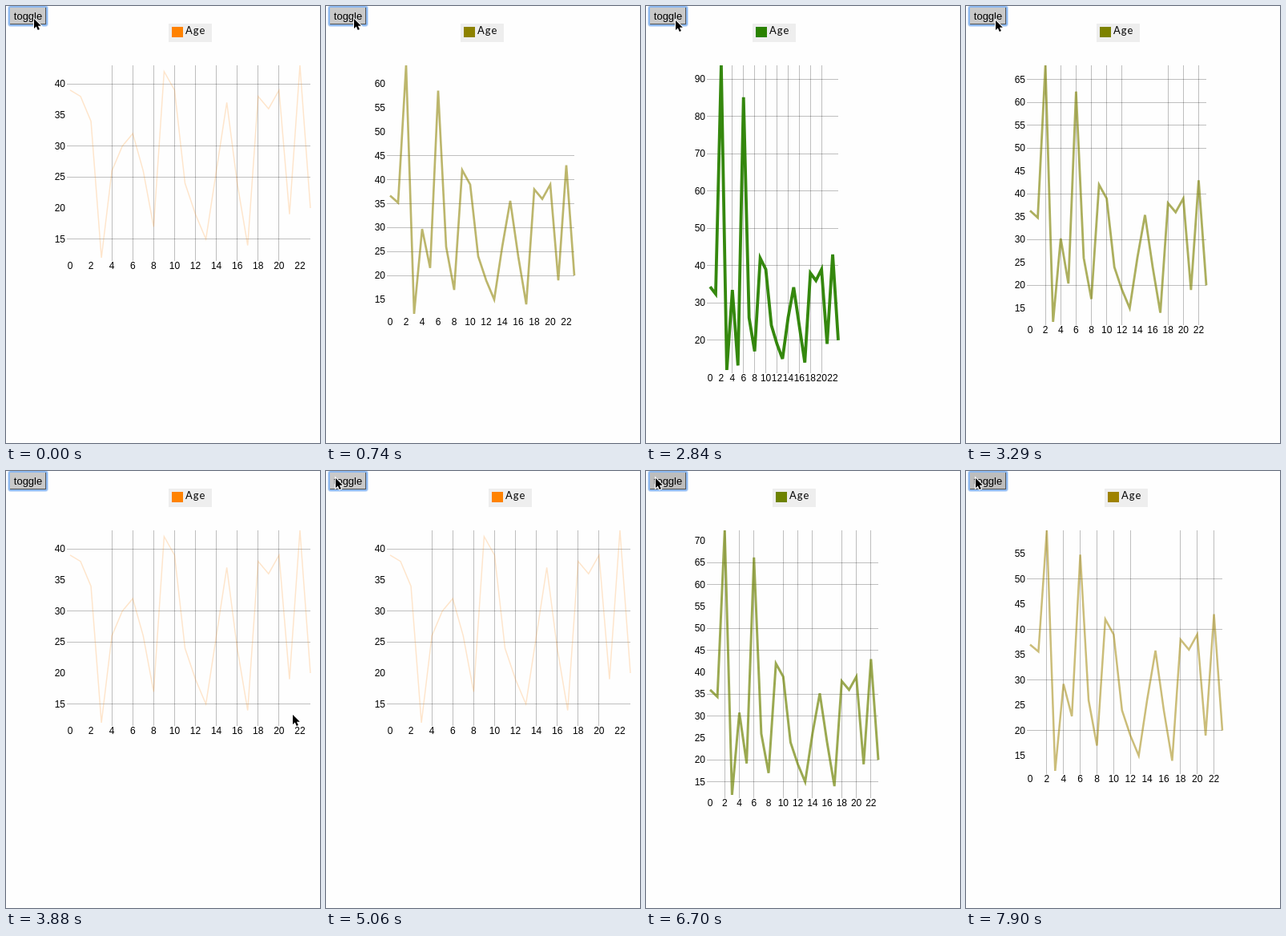
An HTML page with a canvas for the animation above (8000 ms loop, 392x545 px).

```html
<!DOCTYPE html>
<html lang="en">
<head>
<meta charset="utf-8">
<title>Chart toggle</title>
<style>
html, body { margin: 0; width: 100%; height: 100%; overflow: hidden; background: #fefefe; }
canvas { display: block; }
</style>
</head>
<body>
<canvas id="stage" width="392" height="545"></canvas>
<script>
const ctx = document.getElementById('stage').getContext('2d');
const LOOP = 8000, STEP = 148.5;
const LEFT = 80, TOP = 74;

const ages = [39, 38, 34, 12, 26, 30, 32, 26, 17, 42, 39, 24, 19, 15, 26, 37, 24, 14, 38, 36, 39, 19, 43, 20];
const toggled = { 0: 34, 1: 32, 2: 98, 4: 34, 5: 12, 6: 89, 15: 34 };

const mix = (a, b, p) => a + (b - a) * p;

// Number of redraws since a phase began, up to count
function steps(t, start, count) {
  return t < start ? 0 : Math.min(count, 1 + Math.floor((t - start + 10) / STEP));
}

// 0 = wide orange chart, 1 = tall green chart
function progressAt(t) {
  if (t < 2840) {
    const k = steps(t, 450, 7);
    return k && (2 * k + 1) / 15;
  }
  if (t < 6110) return 1 - (2 * steps(t, 2840, 8) - 1) / 15;
  if (t < 7750) return Math.min(0.6, steps(t, 6110, 5) / 7.5);
  return 0.6 - (2 * steps(t, 7750, 2) - 1) / 15;
}

const leaving = [[36, 16], [140, 90], [285, 205], [375, 290], [357, 302]];
const returning = [[357, 302], [350, 295], [310, 250], [225, 170], [120, 85], [45, 30], [12, 10], [3, 4], [11, 7]];

function cursorAt(t) {
  if (t < 2840) return [34, 14];
  if (t < 4030) return leaving[Math.max(0, steps(t, 2840, 8) - 4)];
  return returning[steps(t, 4030, 8)];
}

function text(label, x, y, align, font) {
  ctx.font = font;
  ctx.textAlign = align;
  ctx.fillStyle = '#000';
  ctx.fillText(label, x, y);
}

// Grid lines that straddle two pixels fade out
function isCrisp(v) {
  const f = v - Math.floor(v);
  return f > 0.12 && f < 0.875;
}

function drawChart(p) {
  const width = mix(300, 150, p), height = mix(240, 390, p), bottom = TOP + height;
  const values = ages.map((v, i) => mix(v, toggled[i] ?? v, p));
  const min = Math.min(...values), max = Math.max(...values);
  const xOf = i => LEFT + width * i / (values.length - 1);
  const yOf = v => bottom - height * (v - min) / (max - min);
  const color = `rgb(${Math.min(255, Math.hypot(255 * (1 - p), 38))}, 130, 0)`;
  const font = '12px "Liberation Sans", Arial, sans-serif';
  const grid = 'rgba(0, 0, 0, 0.25)';

  for (let i = 0; i < values.length; i += 2) {
    const x = xOf(i);
    ctx.fillStyle = grid;
    if (i && isCrisp(x)) ctx.fillRect(Math.floor(x), TOP, 1, height + 4);
    text(i, x, bottom + 14, 'center', font);
  }
  const tick = max - min > 66.6 ? 10 : 5;
  for (let v = Math.ceil(min / tick) * tick; v <= max; v += tick) {
    const y = yOf(v);
    ctx.fillStyle = grid;
    if (isCrisp(y)) ctx.fillRect(LEFT - 4, Math.floor(y), width + 4, 1);
    text(v, LEFT - 6, y + 4, 'right', font);
  }

  ctx.save();
  ctx.beginPath();
  ctx.rect(LEFT - 2, TOP, width + 4, height);
  ctx.clip();
  ctx.beginPath();
  values.forEach((v, i) => ctx.lineTo(xOf(i), yOf(v)));
  ctx.globalAlpha = mix(0.2, 1, p);
  ctx.lineWidth = mix(1.5, 4, p);
  ctx.miterLimit = 4;
  ctx.strokeStyle = color;
  ctx.stroke();
  ctx.restore();

  const legend = Math.round(LEFT + width / 2 - 27);
  ctx.fillStyle = '#eee';
  ctx.fillRect(legend, 22, 54, 23);
  ctx.fillStyle = color;
  ctx.fillRect(legend + 4, 26, 14, 13);
  ctx.letterSpacing = '1px';
  text('Age', legend + 21, 35, 'left', '13px Lato, sans-serif');
  ctx.letterSpacing = '0px';
}

function roundBox(x, y, w, h, r, fill) {
  ctx.beginPath();
  ctx.roundRect(x, y, w, h, r);
  ctx.fillStyle = fill;
  ctx.fill();
}

function drawButton(pressed) {
  roundBox(2, -1, 51, 27, 4, '#cfe2fa');
  roundBox(3, 0, 49, 25, 3, '#8db8ef');
  roundBox(5, 2, 45, 21, 0, '#555');
  ctx.fillStyle = pressed ? '#bdbdbd' : '#c9c9c9';
  ctx.fillRect(5, 2, 44, 20);
  text('toggle', 27.5, 17, 'center', '13px "Liberation Sans", Arial, sans-serif');
}

const arrow = new Path2D('M0 0V12L2.8 9.5L4.8 14L6.9 13.1L4.9 8.7H8.8Z');

function drawCursor([x, y]) {
  ctx.save();
  ctx.translate(x + 1, y + 2);
  ctx.lineWidth = 2;
  ctx.strokeStyle = '#fff';
  ctx.stroke(arrow);
  ctx.fillStyle = '#000';
  ctx.fill(arrow);
  ctx.restore();
}

function frame(now) {
  const t = now % LOOP;
  ctx.fillStyle = '#fefefe';
  ctx.fillRect(0, 0, 392, 545);
  drawChart(progressAt(t));
  drawButton(t >= 6110);
  drawCursor(cursorAt(t));
  requestAnimationFrame(frame);
}

frame(0);
</script>
</body>
</html>
```
